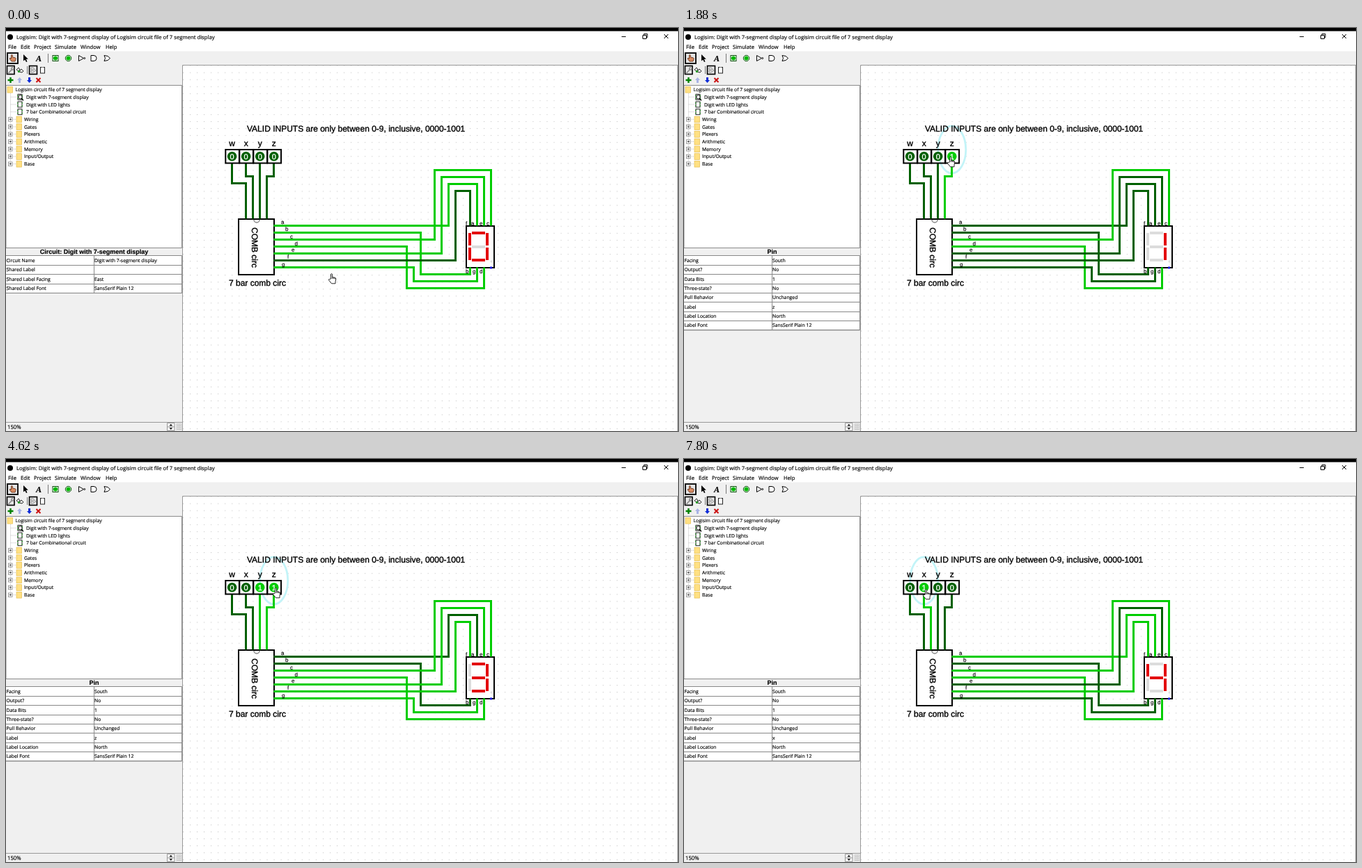
Animation, 965 px wide and 580 px high, one loop 8000 ms. Source, as an HTML page:

```html
<!DOCTYPE html>
<html lang="en">
<head>
<meta charset="utf-8">
<title>Seven segment circuit</title>
<style>
html, body { margin: 0; width: 100%; height: 100%; overflow: hidden; background: #fff; }
svg { display: block; width: 965px; height: 580px; }
text { font: 6.84px "Open Sans", sans-serif; white-space: pre; text-rendering: geometricPrecision; stroke: #000; stroke-width: .15px; }
.title { font-size: 7.72px; }
.menu { font-size: 7.6px; }
.head { font: bold 9px "Liberation Sans", Arial, sans-serif; text-anchor: middle; }
.label { font: 12px "Liberation Sans", Arial, sans-serif; stroke-width: .35px; }
.port { font: 8px "Liberation Sans", Arial, sans-serif; }
.bit { font-size: 11px; fill: #fff; stroke: #fff; }
.mid { text-anchor: middle; }
.wire { fill: none; stroke-width: 3; }
.line { fill: none; stroke: #000; }
</style>
</head>
<body>
<svg viewBox="0 0 965 580">
  <defs>
    <pattern id="grid" x="259.4" y="59.1" width="10.05" height="10.05" patternUnits="userSpaceOnUse">
      <path d="M4.600 4.600h1v1h-1z" fill="#c4c4c4"/>
    </pattern>
  </defs>
  <rect width="965" height="580" fill="#fff"/>
  <rect width="965" height="4.5"/>
  <path d="M0 33.5H965V53H253V580H0z" fill="#f0f0f0"/>
  <rect x="254" y="54" width="711" height="526" fill="url(#grid)"/>
  <path d="M965 53.5H253.5V580M964.500 53V580" class="line" style="stroke:#999"/>
  <circle cx="6" cy="13" r="4"/>
  <path d="M884 12.5h6M914.5 10.5h5v5h-5zM916 10V8.500h5v5h-1.500M945 9l6 6m0-6l-6 6" class="line"/>

  <g id="tools">
    <rect x="2" y="36" width="15" height="15" fill="#e4e4e4" stroke="#000" stroke-width="1.8"/>
    <path d="M7.500 44V39q1-1 1.800 0v3l4 .800q1 .500.800 2L13 48H8l-3-4q.500-1.500 2.500 0z" fill="#d88b62" stroke="#5b2a14" stroke-width=".8"/>
    <path d="M25 38v9.500l2.200-2 1.800 3.500 1.500-.800-1.700-3.400h3z"/>
    <text x="43" y="48" style="font:italic bold 12px 'Liberation Serif',serif">A</text>
    <path d="M60.500 37v13M30.500 55v11" stroke="#777"/>
    <g stroke="#064d06"><rect x="67" y="39.500" width="8" height="8" fill="#fff"/><circle cx="89.500" cy="43.500" r="4.200" fill="#fff"/></g>
    <g fill="#00b800"><circle cx="71" cy="43.500" r="3"/><circle cx="89.500" cy="43.500" r="3"/></g>
    <g fill="#fff" stroke="#000"><path d="M104.500 39.500v8l7-4z"/><circle cx="112.700" cy="43.500" r="1"/>
      <path d="M122 39.500h4a4 4 0 0 1 0 8h-4zM141 39.500q6 0 8.500 4-2.500 4-8.500 4 3-4 0-8z"/></g>
    <g fill="#e4e4e4" stroke="#000" stroke-width="1.600"><rect x="1.500" y="54.500" width="10.500" height="12"/><rect x="33.500" y="54.500" width="11" height="12"/></g>
    <path d="M3.500 65L8 60m0 0q-1-3 2-3.500M8 60q3 1 3-2" class="line" style="stroke:#888;stroke-width:1.500"/>
    <path d="M36 57h3q3 1.500 0 3h-3zm0 4h3q3 1.500 0 3h-3zM40 59l3 2-3 2" class="line" style="stroke:#999"/>
    <path d="M15 60l3-3 2 3-2 2zM19 63l3-4 3 3-2 2z" fill="#fff" stroke="#222"/><circle cx="18.500" cy="62.500" r="1.700" fill="#2a9b2a"/>
    <rect x="49.500" y="56.500" width="6" height="8.500" fill="#fff" stroke="#222"/><path d="M51 56.500h3" stroke="#777"/>
    <path d="M2.500 75h8m-4-4v8" stroke="#008000" stroke-width="2.400"/>
    <path d="M19.500 71l3.500 4h-2v4h-3v-4h-2z" fill="#a9b3e6"/>
    <path d="M33.500 79l3.500-4h-2v-4h-3v4h-2z" fill="#0b2bd8"/>
    <path d="M43.500 72l6 6m0-6l-6 6" stroke="#cb1010" stroke-width="2"/>
  </g>

  <path d="M0 82.500H252.500V316.500H0z" fill="#fff" stroke="#8a8a8a"/>
  <g id="tree"></g>
  <g id="table"></g>
  <path d="M0 567.500H253" stroke="#999"/>
  <rect x="0" y="568" width="231" height="12" fill="#f0f0f0"/>
  <text x="2" y="576.700" class="title">150%</text>
  <path d="M231.500 568.500h10.500v11h-10.500zM231.500 574h10.500" fill="#f6f6f6" stroke="#999"/>
  <path d="M234.500 572.500l2.300-2.500 2.300 2.500zm0 3l2.300 2.500 2.300-2.500z"/>
  <path d="M245 570h7m-7 2.500h7m-7 2.500h7m-7 2.500h7M245.500 569v10m3-10v10m3-10v10" stroke="#bbb" stroke-width=".8"/>

  <ellipse id="halo" cy="175" rx="20" ry="34" fill="none" stroke="#c3f4f8" stroke-width="2.800"/>
  <g id="circuit"></g>
  <path id="hand" d="M3.500 8V1.200q1-1.200 2 0V5.500l4 .8q1.500.5 1.300 2L10 12v2.800H4.500L.5 9.800q-.3-1.700 1.200-1.300zM5.500 5.500v2.500M7.500 6v2M9.300 6.400v2" fill="#fff" stroke="#111" stroke-width=".9" stroke-linejoin="round"/>
</svg>
<script>
const $ = id => document.getElementById(id);
const text = (x, y, s, cls = '') => `<text x="${x}" y="${y}" class="${cls}">${s}</text>`;
const rect = (x, y, w, h, more) => `<rect x="${x}" y="${y}" width="${w}" height="${h}" ${more}/>`;
const ON = '#00cd00', OFF = '#006000';

// Title and menus
const menus = { File: 3, Edit: 21, Project: 40, Simulate: 70, Window: 107, Help: 143 };
$('tools').insertAdjacentHTML('beforebegin',
  text(15, 15.8, 'Logisim: Digit with 7-segment display of Logisim circuit file of 7 segment display', 'title') +
  Object.entries(menus).map(([s, x]) => text(x, 29.6, s, 'menu')).join(''));

// Project tree
const folder = (x, y) => rect(x, y - 4.2, 7.5, 8.7, 'fill="#ffe083" stroke="#e5bd50" stroke-width=".7"');
const rows = ['Logisim circuit file of 7 segment display', 'Digit with 7-segment display',
  'Digit with LED lights', '7 bar Combinational circuit', 'Wiring', 'Gates', 'Plexers',
  'Arithmetic', 'Memory', 'Input/Output', 'Base'];
$('tree').innerHTML = '<path d="M6.500 94V196" stroke="#aaa" stroke-dasharray="1 1" stroke-width=".7"/>' +
  rows.map((s, i) => {
    const y = 88.6 + i * 10.7;
    if (!i) return folder(2, y) + text(13.5, y + 2.5, s);
    const link = `<path d="M7 ${y}h8" stroke="#aaa" stroke-dasharray="1 1" stroke-width=".7"/>`;
    if (i > 3) return link + rect(3.5, y - 2.7, 5.5, 5.5, 'fill="#fff" stroke="#888" stroke-width=".8"') +
      `<path d="M4.700 ${y}h3.200m-1.600-1.600v3.200" stroke="#333" stroke-width=".8"/>` +
      folder(15, y) + text(26, y + 2.5, s);
    const lens = i == 1 ? `<circle cx="20.500" cy="${y}" r="2.700" fill="#fff" stroke="#000"/><path d="M22 ${y + 2}l3 3" stroke="#000" stroke-width="1.500"/>` : '';
    return link + rect(17, y - 4, 6, 8, 'fill="#fff" stroke="#222"') +
      `<path d="M16 ${y - 2}h1.500m-1.500 4h1.500m5-4h1.500m-1.500 4h1.500" stroke="#0a0"/>` + lens + text(29, y + 2.5, s);
  }).join('');

// Attribute table
function table(sel) {
  const list = sel
    ? [['Facing', 'South'], ['Output?', 'No'], ['Data Bits', '1'], ['Three-state?', 'No'],
       ['Pull Behavior', 'Unchanged'], ['Label', sel], ['Label Location', 'North'], ['Label Font', 'SansSerif Plain 12']]
    : [['Circuit Name', 'Digit with 7-segment display'], ['Shared Label', ''],
       ['Shared Label Facing', 'East'], ['Shared Label Font', 'SansSerif Plain 12']];
  const h = 13.36, end = 328 + h * list.length;
  return text(126.5, 325.3, sel ? 'Pin' : 'Circuit: Digit with 7-segment display', 'head') +
    `<path d="M0 327.500H252.500V${end}H0" fill="#fff" stroke="#888"/>` +
    list.map(([a, b], i) => text(.5, 336.8 + i * h, a) + text(127, 336.8 + i * h, b) +
      `<path d="M0 ${Math.floor(328 + (i + 1) * h) + .5}H252.500" stroke="#888"/>`).join('') +
    `<path d="M126.500 328V${end}" stroke="#888"/>`;
}

// Circuit
const wires = {
  w: 'M325 195V224H345V275', x: 'M345 195V214H355V275',
  y: 'M365 195V275', z: 'M385 195V214H375V275',
  a: 'M385 285H636V225H677V285', b: 'M385 295H596V355H667V345',
  c: 'M385 305H616V205H697V285', d: 'M385 315H576V375H687V345',
  e: 'M385 325H626V215H687V285', f: 'M385 335H646V235H667V285',
  g: 'M385 345H586V365H677V345'
};
const segments = {
  a: [664, 295, 4, 18], b: [664, 316, 4, 18], c: [689, 295, 4, 18], d: [689, 316, 4, 18],
  e: [669, 293, 19, 4], f: [669, 313, 19, 4], g: [669, 332, 19, 4]
};
const ports = [['a', 395, 282], ['b', 401, 292], ['c', 408, 302.5], ['d', 414.5, 312.5], ['e', 410, 322],
  ['f', 404, 331.5], ['g', 396, 342.5], ['f', 660, 283.5], ['a', 668, 283.5], ['e', 680, 283.5],
  ['c', 690, 283.5], ['b', 660, 352.5], ['g', 670, 352.5], ['d', 680, 352.5]];
const names = 'wxyz', pinX = i => 325 + 20.05 * i;
const box = 'fill="#fff" stroke="#000" stroke-width="2"';
$('circuit').innerHTML =
  text(346, 149.3, 'VALID INPUTS are only between 0-9, inclusive, 0000-1001', 'label') +
  text(320, 371, '7 bar comb circ', 'label') +
  rect(334, 275, 51, 80, box) + rect(661, 285, 40, 60, box) +
  '<path d="M356 276a4 4 0 0 0 8 0" class="line" style="stroke:#888;stroke-width:1.500"/>' +
  '<text transform="translate(352.800 287) rotate(90)" class="label">COMB circ</text>' +
  '<g transform="translate(-.5 -.5)">' +
  Object.entries(wires).map(([k, d]) => `<path id="wire-${k}" d="${d}" class="wire"/>`).join('') + '</g>' +
  Object.entries(segments).map(([k, s]) => rect(...s, `id="seg-${k}"`)).join('') +
  '<circle cx="697" cy="336" r="1.700" fill="#e4e4e4"/><circle cx="696.500" cy="345" r="1.800" fill="#1818d8"/>' +
  ports.map(([s, x, y]) => text(x, y, s, 'port')).join('') +
  [...names].map((n, i) => text(pinX(i) - .4, 169.5, n, 'label mid') +
    rect(pinX(i) - 9.7, 175, 19.6, 19.5, 'fill="none" stroke="#000" stroke-width="2"') +
    `<circle id="pin-${n}" cx="${pinX(i) - .4}" cy="184.800" r="6.800"/>` +
    `<text id="bit-${n}" x="${pinX(i) - .4}" y="188.800" class="label mid bit">0</text>`).join('');

// Lit outputs for each digit
const lit = ['abcdeg', 'cd', 'bcefg', 'cdefg', 'acdf'];

// Time, input value, poked pin
const states = [[0, 0, ''], [1800, 0, 'z'], [1880, 1, 'z'], [2800, 0, 'z'], [3280, 0, 'y'], [3350, 2, 'y'],
  [4540, 2, 'z'], [4620, 3, 'z'], [6690, 2, 'z'], [6930, 2, 'y'], [7100, 0, 'y'], [7730, 0, 'x'], [7800, 4, 'x']];
// Time, x, y of the pointer
const moves = [[0, 463, 353], [79, 463, 353], [150, 62, 91], [320, 62, 91], [800, 417, 200], [1100, 376, 186],
  [1250, 376, 186], [1420, 374, 184], [1720, 378, 185], [2799, 378, 185], [2880, 370, 185], [3139, 370, 185],
  [3140, 364, 184], [3860, 364, 184], [3930, 367, 184], [4480, 383, 185], [6359, 383, 185], [6360, 380, 185],
  [6449, 380, 185], [6450, 373, 185], [6690, 373, 185], [6880, 362, 184], [7100, 362, 184], [7480, 343, 187], [8000, 343, 187]];

function pointer(t) {
  const i = moves.findIndex(m => m[0] > t), [t0, x0, y0] = moves[i - 1], [t1, x1, y1] = moves[i];
  const k = (t - t0) / (t1 - t0);
  return `translate(${Math.round(x0 + (x1 - x0) * k)} ${Math.round(y0 + (y1 - y0) * k)})`;
}

let shown;
function show(state) {
  if (state === shown) return;
  shown = state;
  const [, value, sel] = state;
  $('table').innerHTML = table(sel);
  $('halo').style.display = sel ? '' : 'none';
  $('halo').setAttribute('cx', pinX(names.indexOf(sel)) - .4);
  [...names].forEach((n, i) => {
    const bit = value >> (3 - i) & 1;
    $('wire-' + n).style.stroke = $('pin-' + n).style.fill = bit ? ON : OFF;
    $('bit-' + n).textContent = bit;
  });
  for (const k in segments) {
    const on = lit[value].includes(k);
    $('wire-' + k).style.stroke = on ? ON : OFF;
    $('seg-' + k).style.fill = on ? '#e3000b' : '#dcdcdc';
  }
}

const start = performance.now();
function frame() {
  const t = (performance.now() - start) % 8000;
  show(states.findLast(s => s[0] <= t));
  $('hand').setAttribute('transform', pointer(t));
  requestAnimationFrame(frame);
}
frame();
</script>
</body>
</html>
```
